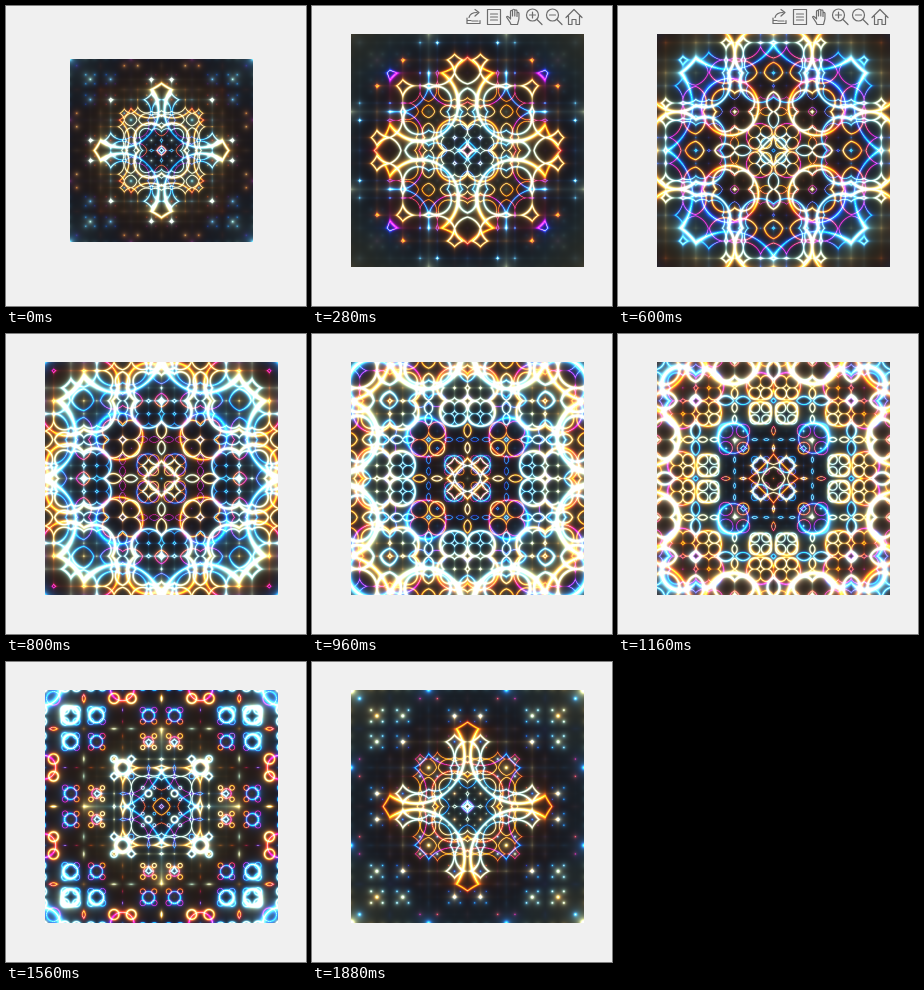
An HTML page with a canvas for the animation above (1920 ms loop, 300x300 px).

```html
<!DOCTYPE html>
<html>
<head>
<meta charset="utf-8">
<style>
html, body { margin: 0; width: 300px; height: 300px; overflow: hidden; background: #f0f0f0; }
canvas, svg { position: absolute; left: 0; top: 0; }
svg { fill: none; stroke: #6c6c6c; stroke-width: 1.2; stroke-linejoin: round; stroke-linecap: round; }
</style>
</head>
<body>
<canvas id="stage" width="300" height="300"></canvas>
<svg id="tools" width="300" height="300">
  <path d="M155 12v5.5h13v-3M155 14.500h4M157 11.500c1-4 4-5 8-5M163 3.500l4 3-4 3.500M160 15h6"/>
  <path d="M175.500 3.500h13v3.500M175.500 3.500v15h13v-3.500M188.500 7v8M178.500 8h7M178.500 11h7M178.500 14h7"/>
  <path d="M199 18.500c-1-3-3-5-4.500-7.500 1-1.500 2.500 0 4 2V5.500c0-1.500 2-1.500 2 0V10 4.500c0-1.700 2.300-1.700 2.300 0V10 5c0-1.600 2.200-1.600 2.200 0v5.500V7.500c0-1.500 2-1.500 2 0 .6 5-.3 7.500-1.500 11z"/>
  <g id="zoom"><circle cx="220.500" cy="9" r="6"/><path d="M225 13.500l5 5M217.500 9h6"/></g>
  <path d="M220.500 6v6"/>
  <use href="#zoom" x="20"/>
  <path d="M254 11.500l8-8 8 8M256.500 10v8.500h3.500v-5h4v5h3.500V10"/>
</svg>
<script>
const LOOP = 1920, STEP = 40, FRAMES = LOOP / STEP, LEVELS = 4, TONES = 1024;
const ctx = document.getElementById('stage').getContext('2d');
const tools = document.getElementById('tools');

// Cosine palette, one full turn
const palette = new Float32Array(TONES * 3);
for (let i = 0; i < TONES; i++)
  [0.263, 0.416, 0.557].forEach((shift, c) => {
    palette[i * 3 + c] = 0.5 + 0.5 * Math.cos(2 * Math.PI * (i / TONES + shift));
  });

const fold = v => v * 1.5 - Math.floor(v * 1.5) - 0.5;

// One quadrant at 2x2 samples per pixel; the rest is mirrored
function makeField(size) {
  const half = Math.ceil(size / 2), side = half * 2;
  const radius = new Float32Array(side * side);
  const phase = new Float32Array(side * side * LEVELS);
  for (let y = 0, s = 0; y < side; y++)
    for (let x = 0; x < side; x++, s++) {
      let u = (x + 0.5) / size - 1, v = (y + 0.5) / size - 1;
      const r = radius[s] = Math.hypot(u, v);
      for (let k = 0; k < LEVELS; k++) {
        u = fold(u);
        v = fold(v);
        phase[s * LEVELS + k] = 10 * Math.hypot(u, v) * Math.exp(-r);
      }
    }
  return { size, half, side, radius, phase, image: ctx.createImageData(size, size) };
}

function paint(field, left, top, t) {
  const { size, half, side, radius, phase, image } = field;
  const out = image.data;
  for (let y = 0; y < half; y++)
    for (let x = 0; x < half; x++) {
      let red = 0, green = 0, blue = 0;
      for (let q = 0; q < 4; q++) {
        const s = (2 * y + (q >> 1)) * side + 2 * x + (q & 1);
        let r = 0, g = 0, b = 0;
        for (let k = 0; k < LEVELS; k++) {
          const d = Math.abs(Math.sin(phase[s * LEVELS + k] + t)) / 10 + 1e-6;
          const glow = Math.pow(0.01 / d, 1.2);
          const tone = 3 * (((radius[s] + 0.4 * (k + t)) * TONES | 0) % TONES);
          r += palette[tone] * glow;
          g += palette[tone + 1] * glow;
          b += palette[tone + 2] * glow;
        }
        red += Math.min(r, 1);
        green += Math.min(g, 1);
        blue += Math.min(b, 1);
      }
      for (const py of [y, size - 1 - y])
        for (const px of [x, size - 1 - x]) {
          const o = (py * size + px) * 4;
          out[o] = red * 63.75;
          out[o + 1] = green * 63.75;
          out[o + 2] = blue * 63.75;
          out[o + 3] = 255;
        }
    }
  ctx.clearRect(0, 0, 300, 300);
  ctx.putImageData(image, left, top);
}

const small = makeField(183), large = makeField(233);
let shown = -1;

function tick() {
  const frame = Math.floor(performance.now() % LOOP / STEP);
  if (frame !== shown) {
    shown = frame;
    const t = (frame + 1) * Math.PI / FRAMES;
    if (frame === 0) paint(small, 64, 53, t);
    else paint(large, 39, 28, t);
    tools.style.display = frame > 0 && frame < 20 ? '' : 'none';
  }
  requestAnimationFrame(tick);
}
tick();
</script>
</body>
</html>
```
